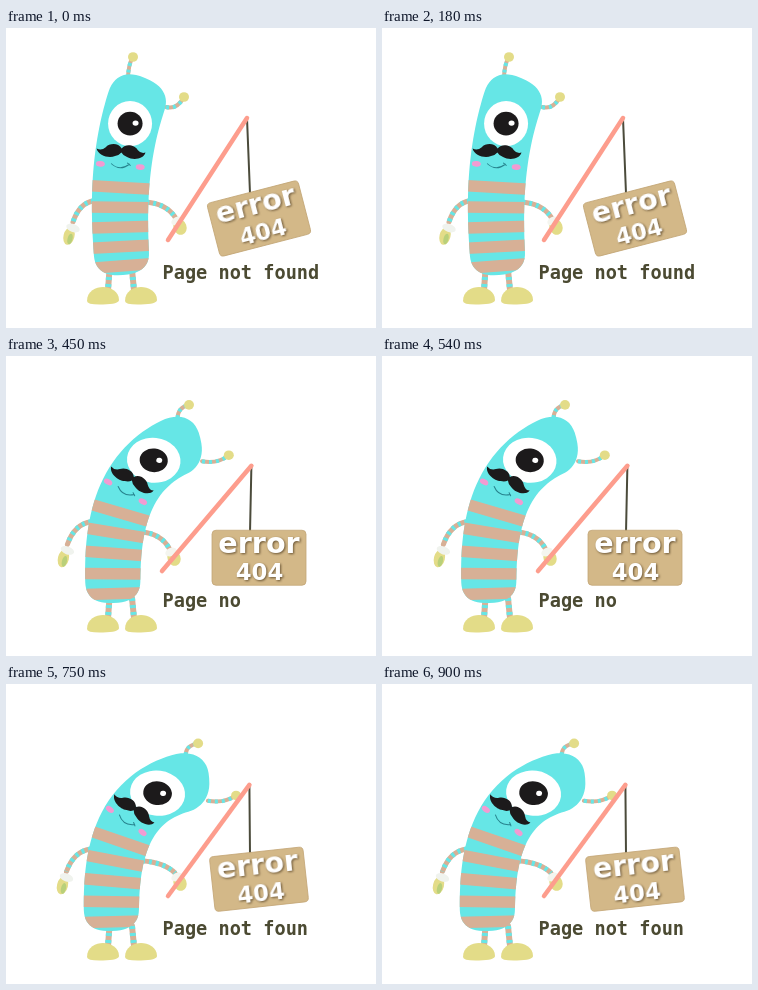
Animation, 370 px wide and 300 px high, one loop 1000 ms. Source, as an HTML page:

```html
<!DOCTYPE html>
<html lang="en">
<head>
<meta charset="utf-8">
<title>Page not found</title>
<style>
html, body { margin: 0; width: 100%; height: 100%; overflow: hidden; background: #fff; }
svg { display: block; width: 370px; height: 300px; }
.pose { visibility: hidden; animation: 1s step-end infinite; }
.upright { animation-name: upright; }
.tilt { animation-name: tilt; }
.bow { animation-name: bow; }
.low { animation-name: low; }
.rise { animation-name: rise; }
@keyframes upright { 0% { visibility: visible; } 30%, 100% { visibility: hidden; } }
@keyframes tilt { 0% { visibility: hidden; } 30% { visibility: visible; } 45%, 100% { visibility: hidden; } }
@keyframes bow { 0% { visibility: hidden; } 45% { visibility: visible; } 60%, 100% { visibility: hidden; } }
@keyframes low { 0% { visibility: hidden; } 60% { visibility: visible; } 75%, 100% { visibility: hidden; } }
@keyframes rise { 0% { visibility: hidden; } 75%, 100% { visibility: visible; } }
.line { fill: none; stroke-linecap: round; }
.caption { font: bold 18.6px "DejaVu Sans Mono", monospace; fill: #4b4a32; white-space: pre; }
.board { font-family: "DejaVu Sans", sans-serif; font-weight: bold; fill: #fff; text-anchor: middle;
  filter: drop-shadow(1.5px 1.5px .8px #6b5636); }
</style>
</head>
<body>
<svg id="stage" viewBox="0 0 370 300" role="img" aria-label="Error 404, page not found"></svg>
<script>
const CYAN = '#66e6e6', TAN = '#d7b096', YELLOW = '#e3dc88', INK = '#1c1a1b';

// bend: how far the body leans; dip: how far the rod tip drops; pull: how far the rod hand draws in
const poses = [
  { name: 'upright', bend: 0, dip: 0, pull: 0, chars: 14 },
  { name: 'tilt', bend: .6, dip: .3, pull: 1, chars: 3 },
  { name: 'bow', bend: .8, dip: .55, pull: 1, chars: 7 },
  { name: 'low', bend: 1, dip: 1, pull: 1, chars: 11 },
  { name: 'rise', bend: .93, dip: .3, pull: 0, chars: 13 }
];

const add = (a, b) => a.map((v, i) => v + b[i]);
const mix = (a, b, t) => a.map((v, i) => v + (b[i] - v) * t);
const smooth = t => t * t * (3 - 2 * t);

const ellipse = ([x, y], rx, ry, fill, turn = 0) =>
  `<ellipse cx="${x}" cy="${y}" rx="${rx}" ry="${ry}" fill="${fill}" transform="rotate(${turn} ${x} ${y})"/>`;

const line = (d, color, width, extra = '') =>
  `<path class="line" d="${d}" stroke="${color}" stroke-width="${width}" ${extra}/>`;

const segment = (a, b) => `M${a}L${b}`;

const striped = (d, width) =>
  line(d, TAN, width) + line(d, CYAN, width, 'stroke-dasharray="3 4" style="stroke-linecap:butt"');

const group = ([x, y], turn, content) =>
  `<g transform="translate(${x} ${y}) rotate(${turn})">${content}</g>`;

// Cubic curve from the feet to the crown
function makeSpine(bend) {
  const foot = [117 - 12 * bend, 247], belly = [112 - 9 * bend, 186];
  const neck = [110 - 5 * bend, 120 - 20 * bend];
  const crown = [139 + 69 * bend, 50 + 52 * bend ** 2.2];
  const at = t => {
    const a = mix(foot, belly, t), b = mix(belly, neck, t), c = mix(neck, crown, t);
    const p = mix(a, b, t), q = mix(b, c, t);
    return { point: mix(p, q, t), angle: Math.atan2(q[0] - p[0], p[1] - q[1]) };
  };
  const side = (t, d) => {
    const { point, angle } = at(t);
    return add(point, [d * Math.cos(angle), d * Math.sin(angle)]);
  };
  return { at, side, crown };
}

// Tube around the spine with rounded ends
function outline(spine) {
  const steps = 60, left = [], right = [];
  for (let i = 0; i <= steps; i++) {
    const t = (1 - Math.cos(Math.PI * i / steps)) / 2;
    const end = Math.min(1, Math.min(t, 1 - t) / .12);
    const half = (27.3 + 2.5 * t) * (1 - (1 - end) ** 2.5) ** .4;
    left.push(spine.side(t, -half));
    right.unshift(spine.side(t, half));
  }
  return `M${[...left, ...right].join('L')}Z`;
}

function bands(spine) {
  let out = '';
  for (let t = .05; t < .5; t += .103) {
    out += line(segment(spine.side(t, -32), spine.side(t, 32)), TAN, 11.5);
  }
  return out;
}

function feelers(crown, bend) {
  const roots = [mix([-17, 2], [-24, -25], bend), mix([21, 29], [-3, 22], bend)];
  const reach = [mix([5, -23], [13, -11], bend), mix([18, -10], [29, -5], bend)];
  return roots.map((offset, i) => {
    const root = add(crown, offset), tip = add(root, reach[i]);
    const elbow = i ? [(root[0] + tip[0]) / 2 + 2, root[1] + 3] : [root[0], (root[1] + tip[1]) / 2 - 4];
    return striped(`M${root}Q${elbow} ${tip}`, 4) + ellipse(tip, 5, 4.8, YELLOW);
  }).join('');
}

const arm = (shoulder, hand) =>
  striped(`M${shoulder}Q${mix(hand, shoulder, .3)[0]} ${shoulder[1] + 2} ${hand}`, 5);

const leftHand = p =>
  ellipse(add(p, [-4, 14]), 5.5, 9, YELLOW, 14) + ellipse(add(p, [-3, 17]), 2.5, 5.5, '#b9d07a', 14)
  + ellipse(add(p, [0, 6]), 7, 4, '#f0f3ee', 20);

const rightHand = p =>
  ellipse(add(p, [5, 10]), 6.5, 8, YELLOW, -20) + ellipse(add(p, [2, 4]), 6, 4, '#f4f5ef', -25);

const leg = (hip, ankle, foot) => striped(segment([hip, 242], [ankle, 262]), 6)
  + `<path transform="translate(${foot} 276)" fill="${YELLOW}"
      d="M-16-3C-16-13-7-17 0-17S16-13 16-4Q16 0 0 .5Q-16 1-16-3Z"/>`;

function face(spine, bend) {
  const { angle } = spine.at(.64);
  const eye = ellipse([0, 0], 22 + 6 * bend, 22.5, '#fff')
    + ellipse([0, 0], 12.5 + 2 * bend, 11.8, INK) + ellipse([5.5, -.5], 3, 2.6, '#fff');
  const mouth = [-20, 20].map(x => ellipse([x, 14], 4.5, 2.8, '#f29bd2')).join('')
    + `<path d="M0-3C-4-9-13-7-16-3Q-20 1-25-1C-23 6-12 8-6 5Q-2 4 0 1Q2 4 6 5C12 8 23 6 24-1Q20 1 16-3C13-7 4-9 0-3Z" fill="${INK}"/>`
    + line('M-9 13Q0 20 9 12M7 11L10 13', '#27838d', 1);
  return group(spine.at(.78).point, 8 * bend, eye)
    + group(spine.side(.64, -3), angle * 180 / Math.PI - 4, mouth);
}

function rodAndBoard(grip, dip) {
  const tip = mix([241, 90], [249, 126], dip);
  const center = [253, 190.5 + 14 * smooth(Math.min(1, 1.3 * dip))];
  const turn = -14.5 * Math.max(0, 1 - 1.9 * dip);
  return line(segment(tip, [244, center[1] - 25]), '#4b4b3b', 2)
    + line(segment(grip, tip), '#fd9d8d', 4.5)
    + group(center, turn, `
      <rect x="-47" y="-27.5" width="94" height="55" rx="4" fill="#d3b888" stroke="#c3a676" stroke-width=".8"/>
      <g class="board"><text y="-5" font-size="28.6">error</text><text x=".5" y="22" font-size="22.8">404</text></g>`);
}

function draw({ name, bend, dip, pull, chars }) {
  const spine = makeSpine(bend), shape = outline(spine), clip = `${name}-body`;
  const grip = mix([162, 212], [156, 215], pull);
  const left = mix([67, 194], [60, 187], bend), right = add(grip, [7, -23]);
  return `<g class="pose ${name}">
    ${leg(103.5, 102, 97)}${leg(126, 128, 135)}
    ${feelers(spine.crown, bend)}
    ${arm(spine.side(.39, -26), left)}${leftHand(left)}
    ${arm(spine.side(.39, 26), right)}${rightHand(right)}
    <clipPath id="${clip}"><path d="${shape}"/></clipPath>
    <path d="${shape}" fill="${CYAN}"/>
    <g clip-path="url(#${clip})">${bands(spine)}</g>
    ${face(spine, bend)}
    ${rodAndBoard(grip, dip)}
    <text class="caption" x="156.5" y="250.5">${'Page not found'.slice(0, chars)}</text>
  </g>`;
}

document.getElementById('stage').innerHTML = poses.map(draw).join('');
</script>
</body>
</html>
```
